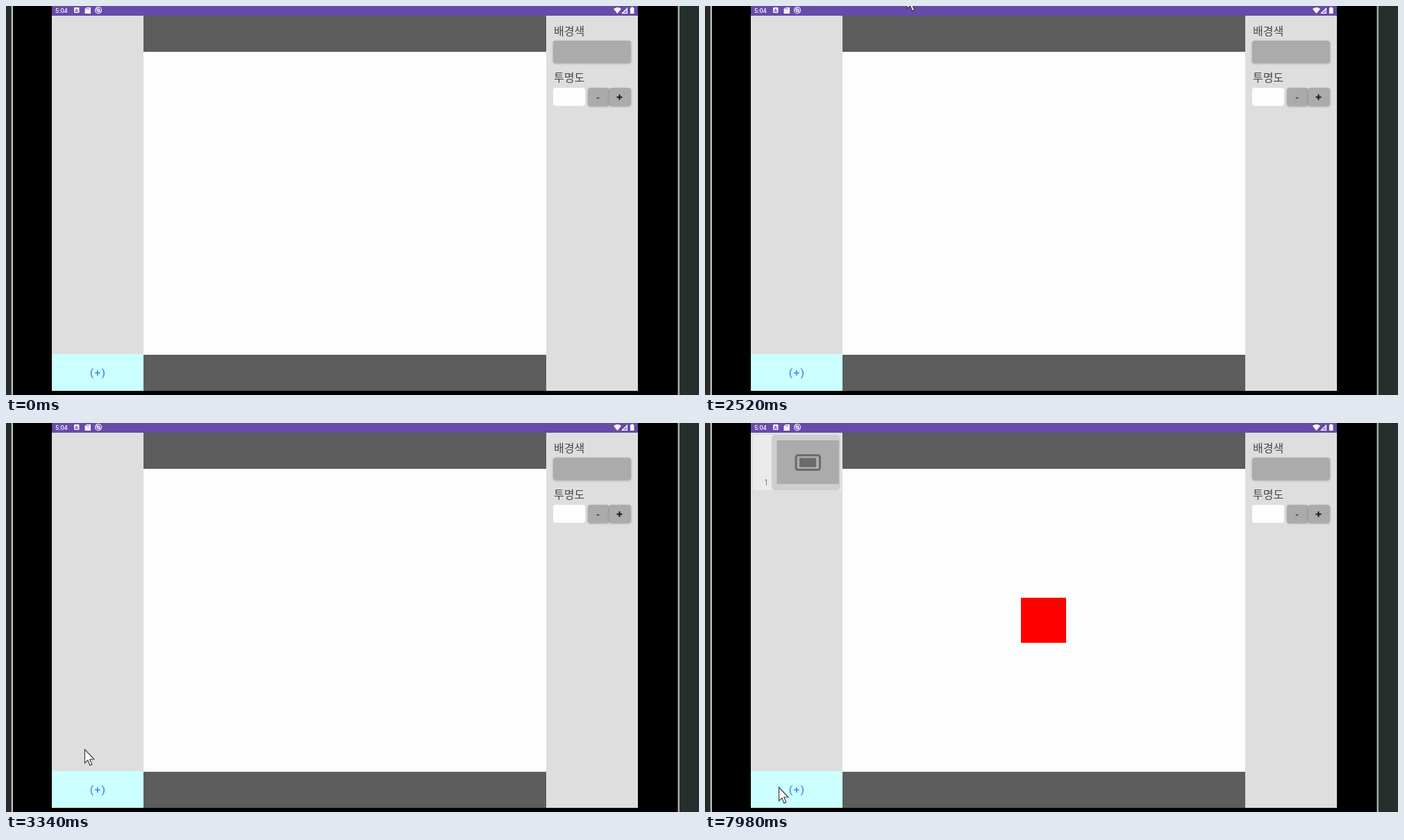
An HTML page with a canvas that plays this animation: 998 by 561 pixels, repeating every 8000 ms.

```html
<!DOCTYPE html>
<html lang="ko">
<head>
<meta charset="utf-8">
<title>Slide editor</title>
<style>
  html, body { margin: 0; width: 100%; height: 100%; overflow: hidden; background: #000; }
  canvas { display: block; width: 998px; height: 561px; }
</style>
</head>
<body>
<canvas id="stage" width="998" height="561"></canvas>
<script>
const ctx = document.getElementById('stage').getContext('2d');
const LOOP = 8000;
const SHAPE_AT = 6740;
const THUMB_AT = 7960;
const LATIN = 'Roboto, sans-serif';
const HANGUL = '"Noto Sans CJK KR", "Noto Sans CJK", sans-serif';

// Each run lists [time, x, y] of the pointer tip; it is hidden between runs.
const runs = [
  { until: 720, keys: [[440, 442, 240], [580, 328, 72], [660, 328, 72], [680, 300, 30], [720, 262, -24]] },
  { until: LOOP, keys: [[2520, 291, -17], [2540, 284, 0], [2960, 141, 371], [3040, 141, 371], [3080, 134, 395],
    [3240, 113, 470], [3340, 113, 470], [3500, 107, 528], [3640, 106, 524], [3940, 106, 525]] }
];

function rect(x, y, w, h, color) {
  ctx.fillStyle = color;
  ctx.fillRect(x, y, w, h);
}

function box(x, y, w, h, radius, color) {
  ctx.fillStyle = color;
  ctx.beginPath();
  ctx.roundRect(x, y, w, h, radius);
  ctx.fill();
}

function polygon(points, color) {
  ctx.beginPath();
  points.forEach(([x, y]) => ctx.lineTo(x, y));
  ctx.closePath();
  ctx.fillStyle = color;
  ctx.fill();
}

function text(str, x, y, font, color, align = 'left', spacing = 0) {
  ctx.font = font;
  ctx.fillStyle = color;
  ctx.textAlign = align;
  ctx.letterSpacing = spacing + 'px';
  ctx.fillText(str, x, y);
  ctx.letterSpacing = '0px';
}

function button(x, y, w, h) {
  ctx.save();
  ctx.shadowColor = 'rgba(0,0,0,.3)';
  ctx.shadowBlur = 3;
  ctx.shadowOffsetY = 1;
  box(x, y, w, h, 4, '#ababab');
  ctx.restore();
}

function drawDevice() {
  rect(0, 0, 998, 561, '#000');
  rect(0, 0, 7, 561, '#252b2b');
  rect(7, 0, 1, 561, '#555');
  rect(8, 0, 2, 561, '#c4c4c4');
  rect(967, 0, 1, 561, '#555');
  rect(968, 0, 2, 561, '#aaa');
  rect(970, 0, 28, 561, '#272e2e');
}

function drawStatusBar() {
  rect(66, 0, 844, 14, '#664ba9');
  text('5:04', 71, 9.7, '500 9px ' + LATIN, '#f4f0fa');

  box(98, 2, 7.5, 8, 1, '#f4f0fa');
  text('A', 101.7, 8.7, 'bold 7px ' + LATIN, '#664ba9', 'center');
  polygon([[113.5, 4.5], [116, 2], [122, 2], [122, 11], [113.5, 11]], '#f4f0fa');
  rect(116, 3, 1, 2, '#8a74bf');
  rect(118, 3, 1, 2, '#8a74bf');
  ctx.strokeStyle = '#f4f0fa';
  ctx.lineWidth = 1.2;
  ctx.beginPath();
  ctx.arc(133, 6.2, 4.5, 0, Math.PI * 2);
  ctx.moveTo(130, 3.2);
  ctx.lineTo(136, 9.2);
  ctx.stroke();
  ctx.beginPath();
  ctx.arc(133, 6.2, 2, 0, Math.PI * 2);
  ctx.stroke();

  ctx.fillStyle = '#fff';
  ctx.beginPath();
  ctx.moveTo(880.5, 11);
  ctx.arc(880.5, 9.5, 7.6, Math.PI * 1.24, Math.PI * 1.76);
  ctx.fill();
  polygon([[886, 11], [895, 2], [895, 11]], '#fff');
  polygon([[888.8, 10], [893.8, 5], [893.8, 10]], '#9a87c8');
  box(899, 2.5, 5.5, 8.5, 0.8, '#fff');
  rect(900.5, 1.5, 2.5, 1.5, '#fff');
}

function drawPanels() {
  rect(66, 14, 132, 488, '#dedede');
  rect(66, 502, 132, 53, '#ccffff');
  rect(198, 14, 580, 541, '#5d5d5d');
  rect(198, 65, 580, 1, '#505050');
  rect(198, 66, 580, 437, '#fdfdfd');
  rect(778, 14, 132, 541, '#dedede');
  text('(+)', 132.5, 534, '500 15.5px ' + LATIN, '#3d8ff0', 'center', 1.4);

  text('배경색', 789, 41.5, '500 16px ' + HANGUL, '#484848');
  button(788, 50, 112, 32);
  text('투명도', 789, 109, '500 16px ' + HANGUL, '#484848');
  box(788, 118, 46, 26, 4, '#fdfdfd');
  button(838, 118, 30.5, 26);
  button(868.5, 118, 31.5, 26);
  text('-', 852.5, 136.5, '500 14px ' + LATIN, '#333', 'center');
  rect(879.5, 130.5, 8, 2, '#181818');
  rect(882.5, 127.5, 2, 8, '#181818');
}

function drawThumbnail() {
  rect(69, 17, 127, 80, '#ebebeb');
  box(96, 17, 99, 80, 5, '#cecece');
  rect(103.5, 25, 89.5, 63, '#ababab');
  ctx.strokeStyle = '#6b6b6b';
  ctx.lineWidth = 3;
  ctx.beginPath();
  ctx.roundRect(131, 46.5, 34.5, 21, 3);
  ctx.stroke();
  rect(136, 50.5, 24, 13, '#6b6b6b');
  text('1', 88, 89.5, '12px ' + LATIN, '#888', 'center');
}

function pointerAt(t) {
  const run = runs.find(r => t >= r.keys[0][0] && t < r.until);
  if (!run) return null;
  const next = run.keys.findIndex(key => key[0] > t);
  if (next < 0) return run.keys[run.keys.length - 1].slice(1);
  const [t0, x0, y0] = run.keys[next - 1];
  const [t1, x1, y1] = run.keys[next];
  const k = (t - t0) / (t1 - t0);
  return [x0 + (x1 - x0) * k, y0 + (y1 - y0) * k];
}

function drawPointer(x, y) {
  ctx.save();
  ctx.translate(x + 0.5, y + 0.5);
  polygon([[0, 0], [0, 19.5], [4.4, 15.4], [7.4, 22.8], [10.3, 21.5], [7.3, 14.3], [13.3, 14]], '#fdfdfd');
  ctx.strokeStyle = '#333';
  ctx.lineWidth = 1.1;
  ctx.stroke();
  ctx.restore();
}

function render(t) {
  drawDevice();
  drawPanels();
  drawStatusBar();
  if (t >= SHAPE_AT) rect(455, 252, 65, 65, '#ff0000');
  if (t >= THUMB_AT) drawThumbnail();
  const tip = pointerAt(t);
  if (tip) drawPointer(...tip);
}

const start = performance.now();
function frame() {
  render((performance.now() - start) % LOOP);
  requestAnimationFrame(frame);
}
frame();
</script>
</body>
</html>
```
